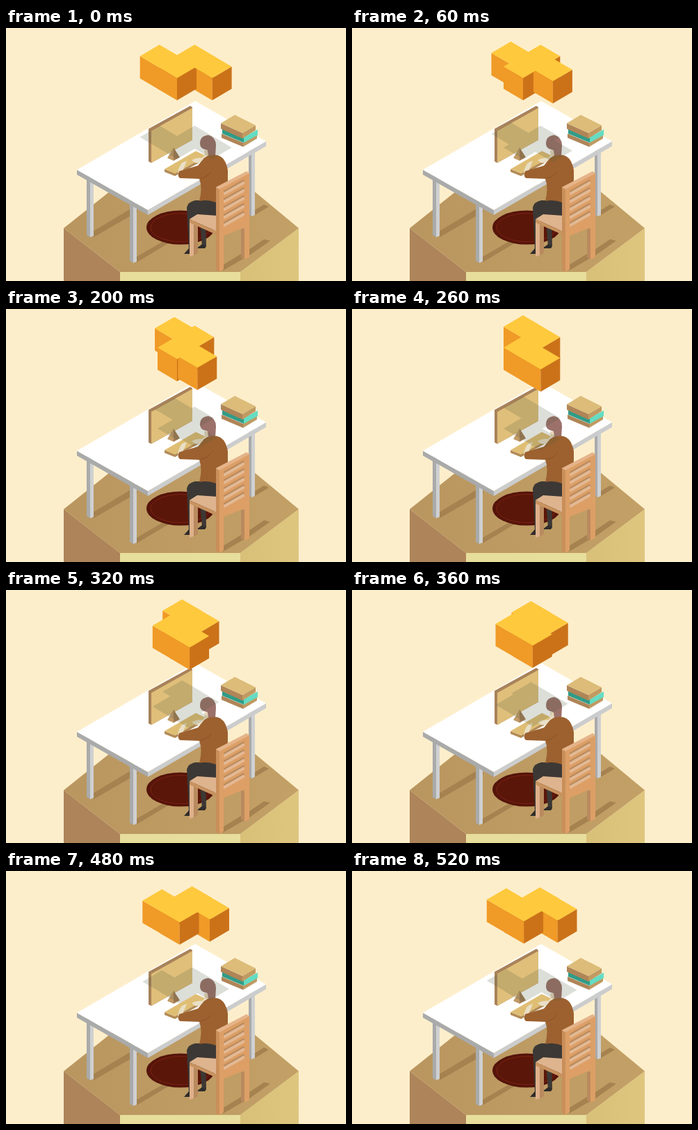
Animation, 489 px wide and 364 px high, one loop 0.54 s. Source, as an HTML page:

```html
<!DOCTYPE html>
<html lang="en">
<head>
<meta charset="utf-8">
<title>Desk and sliding blocks</title>
<style>
  html, body { margin: 0; width: 100%; height: 100%; overflow: hidden; background: #fdeecb; }
  svg { display: block; width: 489px; height: 364px; }
</style>
</head>
<body>
<svg viewBox="0 0 489 364">
  <defs>
    <linearGradient id="floor" x1="0" y1="0" x2="1" y2="0">
      <stop offset="0" stop-color="#b9965f"/><stop offset="1" stop-color="#c2a066"/>
    </linearGradient>
    <linearGradient id="slope" x1="0" y1="0" x2="1" y2="0">
      <stop offset="0" stop-color="#d8c078"/><stop offset="1" stop-color="#dec67f"/>
    </linearGradient>
  </defs>

  <!-- platform -->
  <path fill="#ae845a" d="M83 288L164 351V364H83Z"/>
  <path fill="#e8de9c" d="M164 351H337V364H164Z"/>
  <path fill="url(#slope)" d="M337 351L421 288V364H337Z"/>
  <path fill="url(#floor)" d="M83 288L162 225H345L421 288L337 351H164Z"/>
  <path fill="#a5824f" d="M126 301L190 264L181 259L126 292ZM188 337L240 306L231 304L188 329ZM312 349L343 331L338 325L312 341ZM349 328L380 306L371 304L349 319ZM358 269L378 257L371 254L358 262Z"/>
  <ellipse cx="251" cy="287" rx="49" ry="24.5" fill="#55140a"/>
  <ellipse cx="251" cy="287" rx="43" ry="20.500" fill="#5a1609" stroke="#7d2412"/>

  <!-- table -->
  <path fill="#a9aaaa" d="M116 212H121V301L116 298ZM178 250H183V338L178 335ZM349 174H353V271L349 268Z"/>
  <path fill="#cfd0d1" d="M121 212H126V299L121 301ZM183 250H188V336L183 338ZM353 172H358V269L353 271Z"/>
  <path fill="#a9aaaa" d="M102 204L204 262V269L102 211Z"/>
  <path fill="#cbcccd" d="M204 262L374 163V170L204 269Z"/>
  <path fill="#fff" d="M102 204L272 105L374 163L204 262Z"/>

  <!-- monitor and keyboard -->
  <path fill="#a9825a" d="M205 145L265 112L268 114V161L209 194L205 192Z"/>
  <path fill="#dfbf7a" d="M209 148L268 115V161L209 194Z"/>
  <path fill="#c09a66" d="M241 172L232 187L241 191Z"/>
  <path fill="#a07a52" d="M241 172L250 186L241 191Z"/>
  <path fill="#b38b56" d="M228 203L243 209L288 184V188L243 213L228 207Z"/>
  <path fill="#dfbe74" d="M228 203L273 177L288 184L243 209Z"/>

  <!-- books -->
  <path fill="#b08557" d="M310 152L341 165V171L310 158Z"/>
  <path fill="#c09a62" d="M341 165L361 153V159L341 171Z"/>
  <path fill="#309c87" d="M311 145L342 158V165L311 152Z"/>
  <path fill="#64dcc3" d="M342 157L362 146V154L342 165Z"/>
  <path fill="#b08557" d="M309 137L340 151V159L309 145Z"/>
  <path fill="#c19a62" d="M340 151L359 140V147L340 159Z"/>
  <path fill="#dcbc78" d="M309 137L329 125L359 140L340 151Z"/>

  <!-- person -->
  <path fill="#e9dfc6" d="M247 209Q248 200 253 194L260 191L257 199L253 208ZM267 190Q275 186 282 187L291 178L293 186L283 194L272 194Z"/>
  <path fill="#3c3835" d="M260 258Q262 250 272 248H303V272H287L288 314H282L279 280L271 275L269 318H263Z"/>
  <path fill="#2f2c2b" d="M256 325L264 316L270 318L264 325ZM274 317L282 311L288 314L286 317Z"/>
  <path fill="#9b716a" d="M279 166Q279 155 291 154Q302 157 302 169L301 185H289L290 176L284 174Q279 172 279 166Z"/>
  <path fill="#e7d6b9" d="M285 176L290 176L291 184H286Z"/>
  <path fill="#9c612f" d="M285 187Q294 181 304 183Q316 186 319 205V226L302 251Q290 246 278 249Q283 230 278 217L250 216Q246 213 249 206L276 198Z"/>
  <path fill="none" stroke="#8c5022" d="M280 216Q289 215 295 207"/>

  <!-- chair -->
  <path fill="#deb08a" d="M264 277H270V327L264 329Z"/>
  <path fill="#b98a5e" d="M270 280H276V324L270 327Z"/>
  <path fill="#deb48f" d="M264 275L275 268L304 270V293Z"/>
  <path fill="#c8935f" d="M264 275L304 293V298L264 280Z"/>
  <path fill="#dd9f66" d="M343 212H350V330L343 333Z"/>
  <path fill="#dd9f66" d="M302 229L347 207L350 210V284L313 299L302 300Z"/>
  <path id="gaps" fill="none" stroke="#b98b5f" stroke-width="5"/>
  <path id="slats" fill="none" stroke="#e3b994" stroke-width="4"/>
  <path fill="#dd9f66" d="M343 210L350 209V284L343 288Z"/>
  <path fill="#b98a5e" d="M338 289H343V333L338 330Z"/>
  <path fill="#c98f5b" d="M302 229L307 231V351L302 348Z"/>
  <path fill="#dd9f66" d="M307 231L313 229V347L307 351Z"/>
  <path fill="#e5b48a" d="M302 229L346 206L350 209L307 232Z"/>

  <path id="shade" fill="#505a3c" fill-opacity=".2"/>
  <g id="sides"></g>
  <path id="tops" fill="#ffc93d"/>
</svg>
<script>
  const $ = id => document.getElementById(id);
  const LOOP = 540, TURN = 260, STEP = 20;
  const W = 28, H = 16.4, TALL = 32, DX = 25.3, DY = 15;

  const rows = y => Array.from({ length: 5 }, (_, k) => `M313 ${y + k * 11.3}L343 ${y - 17 + k * 11.3}`).join('');
  $('gaps').setAttribute('d', rows(237));
  $('slats').setAttribute('d', rows(239));

  const faces = [];
  for (let k = 0; k < 8; k++) {
    const face = document.createElementNS('http://www.w3.org/2000/svg', 'path');
    face.setAttribute('fill', k % 2 ? '#cb7219' : '#f09a27');
    faces.push($('sides').appendChild(face));
  }

  // slightly faster at the start, still moving at the end
  const ease = x => x + 0.42 * x * (1 - x);

  // grid cells of the four cubes: first the ends slide, then both bars
  function cells(t) {
    if (t < TURN) {
      const e = ease(t / TURN);
      return [[-1, e], [0, 1], [1, 1 - e], [0, 0]];
    }
    const e = ease((t - TURN) / (LOOP - TURN));
    return [[e - 1, 1], [e, 1], [-e, 0], [1 - e, 0]];
  }

  const lid = ([x, y], dy = 0) => `M${x} ${y + dy}l${W} ${-H}l${W} ${H}l${-W} ${H}Z`;

  function draw(t) {
    const cubes = cells(t)
      .sort((p, q) => p[0] - p[1] - q[0] + q[1])
      .map(([i, j]) => [218 + (i + j) * DX, 55.5 + (i - j) * DY]);
    cubes.forEach(([x, y], k) => {
      faces[2 * k].setAttribute('d', `M${x} ${y}l${W} ${H}v${TALL}l${-W} ${-H}Z`);
      faces[2 * k + 1].setAttribute('d', `M${x + W} ${y + H}l${W} ${-H}v${TALL}l${-W} ${H}Z`);
    });
    $('tops').setAttribute('d', cubes.map(c => lid(c)).join(''));
    $('shade').setAttribute('d', cubes.map(c => lid(c, 116.5)).join(''));
  }

  const start = performance.now();
  function tick() {
    const t = (performance.now() - start) % LOOP;
    draw(Math.floor(t / STEP) * STEP);
    requestAnimationFrame(tick);
  }
  tick();
</script>
</body>
</html>
```
